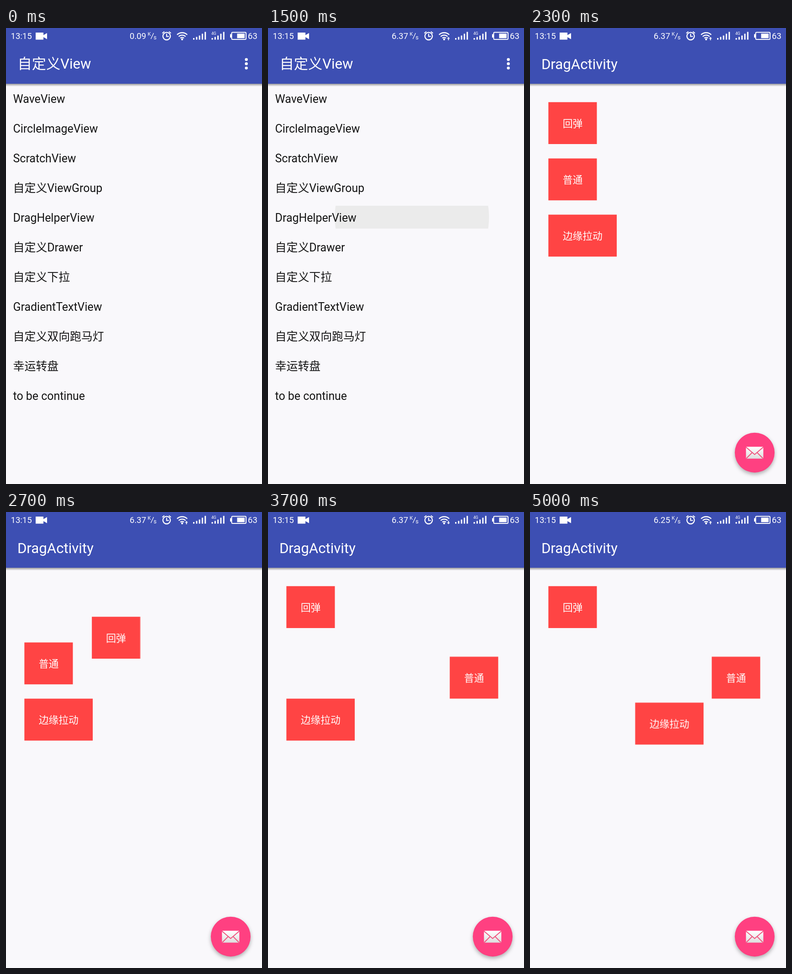
Animation, 561 px wide and 998 px high, one loop 5100 ms. Source, as an HTML page:

```html
<!DOCTYPE html>
<html lang="zh-CN">
<head>
<meta charset="utf-8">
<title>自定义View</title>
<style>
html, body { margin: 0; width: 100%; height: 100%; overflow: hidden; background: #f9f8fb; }
svg { display: block; width: 561px; height: 998px; font-family: Roboto, "Noto Sans CJK SC", "Noto Sans CJK", sans-serif; }
.bar { fill: #3d4fb3; }
.title { font-size: 31.2px; fill: #fff; }
.list { font-size: 24.9px; fill: #141414; }
.tile rect { fill: #ff4444; }
.tile text { font-size: 21.8px; fill: #fff; }
.status { font-size: 18.5px; fill: #fff; }
.line { fill: none; stroke: #fff; stroke-width: 2.3; }
.fab { filter: drop-shadow(0 4px 4px rgba(0, 0, 0, .3)); }

.ripple, .page, .tile, .speed, .arrow { animation: 5.1s linear infinite; }
.ripple { transform-box: fill-box; transform-origin: center; animation-name: ripple; }
.page { animation-name: open; }
.spring { animation-name: spring; }
.free { animation-name: free; }
.edge { animation-name: edge; }
.idle { animation-name: idle; }
.busy { animation-name: busy; }
.late { animation-name: late; }
.up { animation-name: up; }
.down { animation-name: down; }

@keyframes ripple {
  0% { opacity: 0; transform: scale(.1); animation-timing-function: step-end; }
  27.45% { opacity: 1; transform: scale(.5); animation-timing-function: step-end; }
  29.41% { opacity: 1; transform: scale(1); animation-timing-function: step-end; }
  31.37% { opacity: 1; transform: scale(2); }
  35.29%, 100% { opacity: 0; transform: scale(2); }
}
@keyframes open {
  0%, 31.37% { opacity: 0; transform: translateY(80px); animation-timing-function: ease-out; }
  35.29%, 100% { opacity: 1; transform: none; }
}
@keyframes spring {
  0%, 47.05% { transform: none; animation-timing-function: ease-in-out; }
  52.94%, 54.9% { transform: translate(147.5px, 67px); animation-timing-function: ease-out; }
  59.8%, 100% { transform: none; }
}
@keyframes free {
  0%, 62.74% { transform: none; animation-timing-function: ease-in-out; }
  71.5%, 100% { transform: translate(358px, 31.2px); }
}
@keyframes edge {
  0%, 80.39% { transform: none; animation-timing-function: ease-in-out; }
  94.11%, 100% { transform: translate(190.2px, 8.7px); }
}
@keyframes idle { 0%, 19.6% { opacity: 1; } 19.61%, 100% { opacity: 0; } }
@keyframes busy { 0%, 19.6% { opacity: 0; } 19.61%, 84.3% { opacity: 1; } 84.31%, 100% { opacity: 0; } }
@keyframes late { 0%, 84.3% { opacity: 0; } 84.31%, 100% { opacity: 1; } }
@keyframes up {
  0%, 19.6% { opacity: 0; }
  19.61%, 66.66% { opacity: 1; }
  66.67%, 84.3% { opacity: 0; }
  84.31%, 100% { opacity: 1; }
}
@keyframes down { 0%, 66.66% { opacity: 0; } 66.67%, 84.3% { opacity: 1; } 84.31%, 100% { opacity: 0; } }
</style>
</head>
<body>
<svg viewBox="0 0 561 998">
  <defs>
    <linearGradient id="shade" x2="0" y2="1">
      <stop offset="0" stop-opacity=".38"/>
      <stop offset="1" stop-opacity="0"/>
    </linearGradient>
    <linearGradient id="paper" x2="0" y2="1">
      <stop offset="0" stop-color="#fff"/>
      <stop offset="1" stop-color="#dedede"/>
    </linearGradient>
    <clipPath id="row"><rect y="389.3" width="561" height="49.2"/></clipPath>
    <g id="frame">
      <rect width="561" height="998" fill="#f9f8fb"/>
      <rect y="122" width="561" height="6" fill="url(#shade)"/>
      <rect class="bar" width="561" height="122"/>
    </g>
    <path id="bars" d="M0 22h3v3.5h-3z M6.3 19.5h3v6h-3z M12.6 16.5h3v9h-3z M18.9 12.5h3v13h-3z M25.2 8.5h3v17h-3z"/>
  </defs>

  <use href="#frame"/>
  <text class="title" x="25.5" y="89">自定义View</text>
  <g fill="#fff">
    <circle cx="526.7" cy="69" r="3.2"/>
    <circle cx="526.7" cy="78.3" r="3.2"/>
    <circle cx="526.7" cy="87.6" r="3.2"/>
  </g>
  <g clip-path="url(#row)"><circle class="ripple" cx="315.3" cy="414" r="169" fill="#ebebeb"/></g>
  <g class="list" id="list"></g>

  <g class="page">
    <use href="#frame"/>
    <text class="title" x="24.9" y="90">DragActivity</text>
    <g class="tile spring">
      <rect x="40.3" y="162.3" width="106.2" height="91.7"/>
      <text x="71.7" y="216.5">回弹</text>
    </g>
    <g class="tile free">
      <rect x="40.3" y="285.5" width="106.2" height="91.7"/>
      <text x="71.7" y="339.7">普通</text>
    </g>
    <g class="tile edge">
      <rect x="40.3" y="408.5" width="149.8" height="91.8"/>
      <text x="71.7" y="462.8">边缘拉动</text>
    </g>
    <circle class="fab" cx="492.4" cy="929.3" r="43.6" fill="#ff4081"/>
    <rect x="473.3" y="916.5" width="38" height="26" rx="1.5" fill="url(#paper)"/>
    <path d="M473.5 917.5L492.3 933.5L511 917.5M474 942L486.5 929.5M510.5 942L498 929.5" fill="none" stroke="#f0557f" stroke-width="2"/>
  </g>

  <g class="status">
    <text x="10.5" y="24">13:15</text>
    <path d="M65 10h17v5.5l8-4.5v13.500l-8-4.500v5.500h-17z"/>
    <text class="speed idle" x="271" y="24">0.09</text>
    <text class="speed busy" x="271" y="24">6.37</text>
    <text class="speed late" x="271" y="24">6.25</text>
    <text x="310.5" y="17" font-size="11">K</text>
    <text x="323.3" y="24.500" font-size="13">s</text>
    <path class="line" style="stroke-width:1.3" d="M323.500 11L317.500 24"/>
    <circle class="line" cx="352" cy="17.800" r="8.200"/>
    <path class="line" style="stroke-width:2" d="M352 12.500V18.500H357M342.500 11.500L347 7.800M361.500 11.500L357 7.800"/>
    <path class="line" d="M374.800 14.800A16 16 0 0 1 397.200 14.800M378.400 18.700A10.800 10.800 0 0 1 393.600 18.700M381.900 22.300A5.800 5.800 0 0 1 390.100 22.300"/>
    <circle cx="386" cy="24.800" r="2.200"/>
    <path class="arrow up" d="M395.500 19.500l3.200 3.700h-2.200v3.600h-2v-3.600h-2.200z"/>
    <path class="arrow down" d="M395.500 26.800l3.200-3.700h-2.200v-3.600h-2v3.600h-2.200z"/>
    <use href="#bars" x="410"/>
    <use href="#bars" x="450.500"/>
    <text x="450" y="14.500" font-size="8.500">4G</text>
    <rect class="line" style="stroke-width:2" x="494.500" y="9.500" width="31.500" height="15.500" rx="2"/>
    <rect x="491" y="13.500" width="3" height="7.500"/>
    <rect x="506.500" y="12.300" width="16.500" height="10"/>
    <text x="530" y="24">63</text>
  </g>
</svg>
<script>
const items = ["WaveView", "CircleImageView", "ScratchView", "自定义ViewGroup", "DragHelperView",
  "自定义Drawer", "自定义下拉", "GradientTextView", "自定义双向跑马灯", "幸运转盘", "to be continue"];
const list = document.getElementById("list");
items.forEach((name, i) => {
  const row = document.createElementNS("http://www.w3.org/2000/svg", "text");
  row.setAttribute("x", 15.6);
  row.setAttribute("y", 163.8 + i * 65);
  row.textContent = name;
  list.append(row);
});
</script>
</body>
</html>
```
